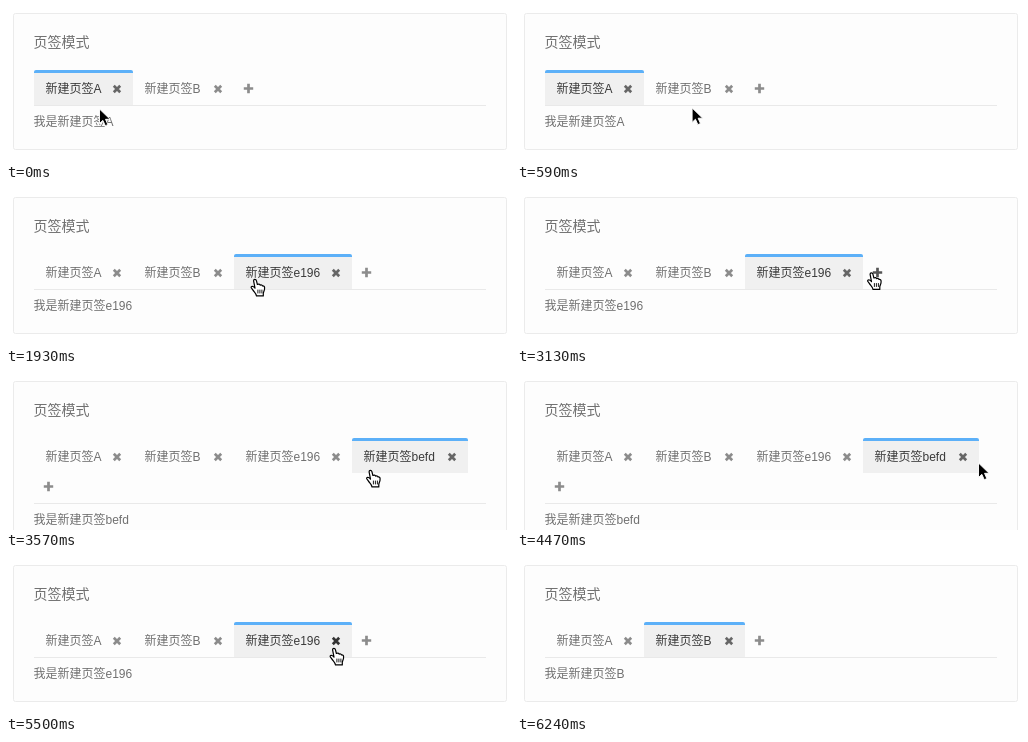
Animation of 505 by 156 pixels, one loop 7.14 s. Source, as an HTML page:

```html
<!DOCTYPE html>
<html lang="zh-CN">
<head>
<meta charset="utf-8">
<title>页签模式</title>
<style>
html, body { margin: 0; width: 100%; height: 100%; overflow: hidden; background: #fff; }
svg { display: block; }
text { font: 12px "Liberation Sans", Arial, "Noto Sans CJK SC", "Noto Sans CJK", sans-serif; fill: #707070; white-space: pre; }
.title { font-size: 14px; }
.on { fill: #3a3a3a; }
.icon { fill: none; stroke-width: 2.7; }
</style>
</head>
<body>
<svg id="stage" width="505" height="156" viewBox="0 0 505 156"></svg>
<script>
const TICKS = 48, TICK = 7140 / TICKS;
const LEFT = 28, TOP = 64, BASE = 99, ROW = 30;
const stage = document.getElementById('stage');

const tabs = [
  { name: 'A', w: 99 }, { name: 'B', w: 101 }, { name: 'e196', w: 118 }, { name: 'befd', w: 116 }
];
tabs.reduce((x, tab) => (tab.x = x) + tab.w, LEFT);

// Clicks, in ticks: the number of tabs and the active one afterwards
const clicks = [
  { at: 0, count: 2, active: 0 },
  { at: 7, count: 2, active: 1 },
  { at: 11, count: 3, active: 2 },
  { at: 22, count: 4, active: 3 },
  { at: 33, count: 3, active: 2 },
  { at: 39, count: 2, active: 1 }
];

// Pointer moves: first and last tick, end point, downward sag of the path
const home = [94, 103.5];
const moves = [
  [0, 5, 179, 95, 12],
  [7, 10, 237, 83, 0],
  [11, 13, 249.5, 90, 0],
  [13, 19, 355, 83.5, 20],
  [22, 24, 365, 97, 0],
  [25, 27, 370, 98, 0],
  [28, 30, 462, 89.5, 0],
  [30, 32, 446, 86, 0],
  [33, 37, 328.5, 91, 5],
  [38, 42, 302, 170, 0]
];

function pointer(n) {
  let [x, y] = home;
  for (const [from, to, endX, endY, sag] of moves) {
    if (n <= from) break;
    const p = Math.min(1, (n - from) / (to - from));
    const ease = p * (2 - p);
    x += (endX - x) * ease;
    y += (endY - y) * ease + sag * Math.sin(Math.PI * p);
  }
  return [x, y];
}

const rect = (x, y, w, h, fill) =>
  `<rect x="${x}" y="${y}" width="${w}" height="${h}" fill="${fill}"/>`;
const text = (s, x, y, cls = '') => `<text class="${cls}" x="${x}" y="${y}">${s}</text>`;
const icon = (d, x, y, color) =>
  `<path class="icon" d="${d}" transform="translate(${x} ${y})" stroke="${color}"/>`;
const bar = (x, w) =>
  `<path d="M${x} ${TOP + 3}v-1q0-2 2-2h${w - 4}q2 0 2 2v1z" fill="#5cb0f8"/>`;
const CROSS = 'M-3.2-3.2 3.2 3.2M3.2-3.2-3.2 3.2';
const PLUS = 'M-4.7 0H4.7M0-4.7V4.7';

const arrow = `<path d="M0 0V15.6L3.6 12.2 6.2 18 9 16.8 6.5 11.1H11.4Z"
  transform="translate(-.5 -.5) scale(.93)" fill="#000" stroke="#fff"/>`;
const hand = `<g transform="translate(-5.3 -1)" stroke="#000" stroke-linejoin="round" stroke-linecap="round">
  <path d="M3.4 1.8C3.4 0 5.8 0 6.2 1.6L7.2 5.5C8.3 4.7 9.5 5 9.9 6.1 11 5.5 12 6 12.3 7
    13.5 6.7 14.4 7.4 14.4 8.7 14.6 11.3 13.4 12.6 13.1 14.2V16.9H6.3C6.1 14.6 3.9 13 2.6 10.9
    1.6 9.4.4 8.6 1 7.8 1.9 6.8 3.6 7.7 4.8 9.2Z" fill="#fff" stroke-width="1.2"/>
  <path d="M7.7 11V14M9.7 11V14M11.7 11V14" fill="none" stroke-width=".9"/></g>`;

function draw(n) {
  const { count, active } = clicks.findLast(c => c.at <= n);
  const [px, py] = pointer(n);
  const shown = tabs.slice(0, count);
  const last = shown[count - 1];
  const drop = count > 3 ? ROW : 0;
  const plusX = (drop ? LEFT : last.x + last.w) + 14.5, plusY = 82.5 + drop;
  const overPlus = Math.abs(px - plusX) < 9 && Math.abs(py - plusY) < 11;
  let hot = overPlus;

  let out = `<rect x="7.5" y="7.5" width="493" height="${136 + drop}" rx="2" fill="#fdfdfd" stroke="#ebebeb"/>`;
  out += text('页签模式', 27.5, 40.5, 'title');
  out += rect(LEFT, BASE + drop, 452, 1, '#e9e9e9');

  shown.forEach(({ name, x, w }, i) => {
    const on = i === active;
    const over = px >= x && px < x + w && py >= TOP && py < BASE;
    const crossX = x + w - 16;
    const overCross = over && Math.abs(px - crossX) < 7 && Math.abs(py - 83) < 10;
    hot = hot || over;
    if (on || over) out += rect(x, TOP + 2, w, BASE - TOP - 2, '#f0f0f0');
    if (on) out += bar(x, w);
    out += text('新建页签' + name, x + 11.5, 87, on || over ? 'on' : '');
    out += icon(CROSS, crossX, 83, overCross ? '#333' : on ? '#666' : '#8c8c8c');
  });

  out += icon(PLUS, plusX, plusY, overPlus ? '#555' : '#8c8c8c');
  out += text('我是新建页签' + tabs[active].name, 27.5, 120 + drop);
  out += `<g transform="translate(${px} ${py})">${hot ? hand : arrow}</g>`;
  stage.innerHTML = out;
}

const start = performance.now();
let current = -1;
function loop() {
  // The small lead absorbs the rounding of tick times
  const n = Math.floor((performance.now() - start + 6) / TICK) % TICKS;
  if (n !== current) draw(current = n);
  requestAnimationFrame(loop);
}
loop();
</script>
</body>
</html>
```
